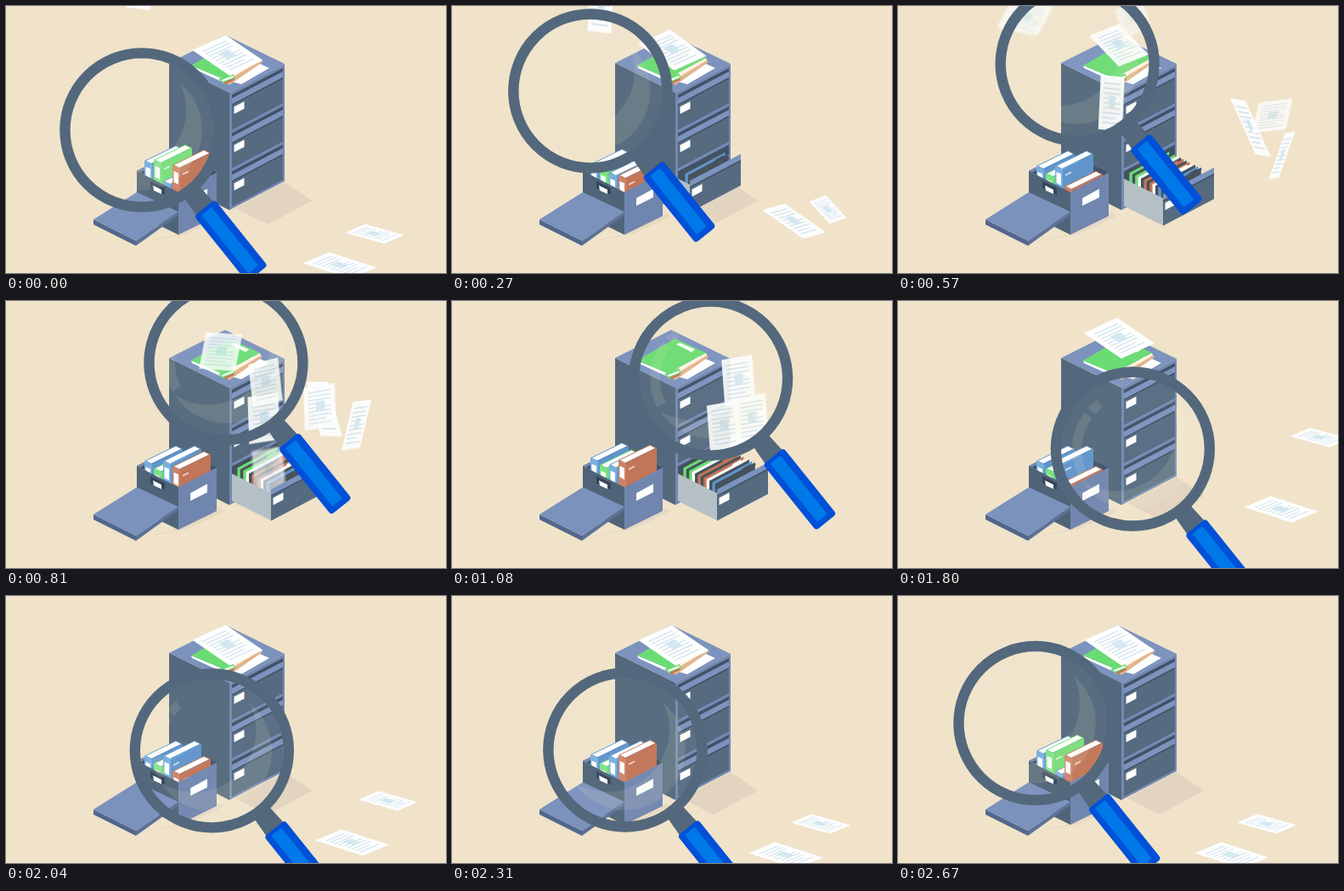
Recreate the animation shown at these times as an HTML page. Size 518 by 314 pixels, loop 2700 ms.

```html
<!DOCTYPE html>
<html lang="en">
<head>
<meta charset="utf-8">
<title>Searching the archive</title>
<style>
html, body { margin: 0; width: 100%; height: 100%; overflow: hidden; background: #f0e3ca; }
svg { display: block; width: 518px; height: 314px; }
</style>
</head>
<body>
<svg id="stage" viewBox="0 0 518 314" xmlns="http://www.w3.org/2000/svg"></svg>
<script>
const LOOP = 2700;
const C = {
  steel: '#53687c', dark: '#405267', light: '#7c93be', frame: '#7489b2', panel: '#566b80', ink: '#46525c',
  green: '#6bdc74', orange: '#c27558', blue: '#5f95cb', white: '#fdfefe', tan: '#e3b48c'
};

// ---- motion helpers ----
const clamp = v => Math.max(0, Math.min(1, v));
const mix = (a, b, u) => a.map((v, i) => v + (b[i] - v) * u);
const smooth = (t, from, to) => {
  const u = clamp((t - from) / (to - from));
  return u * u * (3 - 2 * u);
};
// 1 between the two ramps, 0 outside.
const hold = (t, rise, fall) => smooth(t, ...rise) - smooth(t, ...fall);

// Smooth curve through keys [time, ...values]; closed curves wrap around the loop.
function curve(keys, closed) {
  const n = keys.length;
  const key = i => {
    if (!closed) return keys[Math.max(0, Math.min(n - 1, i))];
    const [t, ...v] = keys[(i + n) % n];
    return [t + LOOP * Math.floor(i / n), ...v];
  };
  const slope = (i, j) => (key(i + 1)[j] - key(i - 1)[j]) / (key(i + 1)[0] - key(i - 1)[0]);
  return t => {
    let i = 0;
    while (i < n - (closed ? 1 : 2) && key(i + 1)[0] <= t) i++;
    const a = key(i), b = key(i + 1), d = b[0] - a[0], u = clamp((t - a[0]) / d), w = 1 - u;
    return a.map((v, j) => v * (1 + 2 * u) * w * w + b[j] * u * u * (3 - 2 * u) +
      d * u * w * (slope(i, j) * w - slope(i + 1, j) * u)).slice(1);
  };
}

// ---- drawing helpers ----
const poly = (pts, fill) => `<polygon points="${pts}" fill="${fill}"/>`;
const rect = (x, y, w, h, fill, more = '') =>
  `<rect x="${x}" y="${y}" width="${w}" height="${h}" fill="${fill}" ${more}/>`;
// Sheared plane of the cabinet front: u runs along the face, v down.
const face = s => `<g transform="matrix(1 -.523 0 1 263 0)">${s}</g>`;
const slot = v => rect(3, v, 60, 41, C.dark);
const drawer = v => rect(3, v + 10, 60, 31, C.panel) + rect(3, v + 4, 60, 7, C.light) +
  rect(3, v + 11, 60, 1.6, C.dark) + rect(5.5, v + 15.5, 12, 8.5, C.white);

const cabinet = poly('270,238 328,207 360,229 308,257', '#e2d4c0') +
  poly('192,67 263,102 263,240 192,204', C.steel) +
  poly('192,67 258,34 328,68 263,102', C.light) +
  face(rect(0, 102, 65, 138, C.frame) +
    [106, 151, 196].map(slot).join('') + [106, 151].map(drawer).join(''));

const pile = poly('262,88 290,64 310,73 277,92', C.white) +
  poly('254,86 299,62 302,66 263,93', C.tan) +
  poly('254,85 299,61 300,64 258,89', '#fff3e2') +
  poly('218,70 254,85 254,89 219,73', C.white) +
  poly('218,70 263,44 299,61 254,85', C.green) +
  poly('264,51 268,49 286,57 282,60', C.white) +
  poly('250,86 267,79 270,85 257,92', C.green) +
  poly('254,87 267,82 268,84 255,89', C.white) +
  poly('256,90 268,85 269,87 258,92', C.orange);

const boxBack = poly('160,278 204,268 252,244 258,247 214,268', '#e7d9c2') +
  poly('154,194 198,172 248,196 203,219', '#42546a') +
  poly('154,194 198,172 198,175 157,196', C.frame);

const boxFront = poly('154,194 203,219 203,269 154,245', '#4f6478') +
  poly('203,219 248,196 248,247 203,269', '#7186ae') +
  poly('217,226 237,215 237,225 217,235', C.white) +
  poly('170,206 187,214 187,222 170,214', '#34465a') +
  poly('173,211 183,216 183,221 174,217', C.white) +
  poly('103,251 153,276 153,282 103,257', '#52678a') +
  poly('153,276 203,242 203,246 153,282', '#5d7297') +
  poly('103,251 154,219 203,242 153,276', '#7b92bd');

const bookArt = (color, edge) =>
  poly('9,4 45,-14 45,22 9,40', color) + poly('0,0 37,-18 45,-14 9,4', color) +
  poly('2,0 37,-17 43,-14 8,3', C.white) + poly('0,0 9,4 9,36 0,32', edge) +
  poly('1.5,7 7,9.5 7,23 1.5,20', C.white) + poly('12,10 19,6.5 19,8.5 12,12', '#ffffffaa');

const fileArt = (color, tab) => poly('2,-9 49,-34 49,-4 2,24', color) +
  poly(`${tab},-23 ${tab + 2},-27 ${tab + 11},-32 ${tab + 13},-30`, color);

const sheetArt = rect(0, 0, 100, 100, C.white) +
  Array.from({ length: 9 }, (_, i) =>
    rect(14, 13 + i * 9, i % 4 == 3 ? 56 : 72, 2.6, '#cfe0e9')).join('') +
  rect(38, 36, 27, 24, '#d3e8f1');

const lensArt = `
  <circle r="85" fill="#fff" opacity=".03"/>
  <g fill="#f6f2c6" opacity=".11">
    <path d="M45 -55A71 71 0 1 1 -60 38A73 73 0 0 0 45 -55Z"/>
    <path d="M-63 34A72 72 0 0 1 -57 -43L-48 -36A60 60 0 0 0 -53 28Z"/>
    <path d="M-53 -48A72 72 0 0 1 -42 -58L-36 -49A60 60 0 0 0 -44 -41Z"/>
  </g>
  <circle r="90.5" fill="none" stroke="${C.steel}" stroke-width="12.4"/>
  <g transform="rotate(51.2)">
    ${poly('90,-11 120,-13 120,13 90,11', C.steel)}
    ${rect(117.5, -15.5, 99.5, 31, '#0050d8', 'rx="4"')}
    ${rect(122, -7, 88, 15, '#0079e8', 'rx="1"')}
  </g>`;

// ---- moving parts ----
const lensPath = curve([[0, 160, 146], [285, 164, 98], [570, 211, 68], [1080, 304.5, 91],
  [1470, 313, 146], [1800, 276.5, 174], [2310, 204, 181]], true);

// Binders bob twice per loop; "away" is the shift while out of the home position.
const books = [
  { color: C.blue, edge: '#79aede', top: 182, away: 6, rise: [0, 450], fall: [800, 1300] },
  { color: C.green, edge: '#7be383', top: 181, away: 16, rise: [40, 420], fall: [960, 1320] },
  { color: C.blue, edge: '#79aede', top: 206, away: -18, rise: [60, 450], fall: [960, 1330] },
  { color: C.orange, edge: '#cf8264', top: 187, away: 25, rise: [100, 450], fall: [570, 950] }
];

// Hanging files: three colour bands, each with dark and white neighbours.
const files = Array.from({ length: 13 }, (_, i) => {
  const band = [C.green, C.orange, C.blue][Math.floor(i / 5)];
  return { color: [C.ink, band, C.ink, band, C.white][i % 5], depth: 1 + i * 3.4, tab: 28 + i * 5 % 14 };
});

// Pose: centre, short edge, long edge. Each sheet passes "mid", hovers, then drops into the drawer;
// sheets with a "rest" pose later glide back to it from an offset.
const MID = 570, MOUTH = [318, 216], UPRIGHT = [36, -6, 4, 54];
const sheets = [
  { rest: [261, 58, 39, -18, 44, 30], mid: [260, 46, 35, -14, 35, 36], hover: [296, 110], at: 760,
    back: { from: [-4, -110], start: 1600, power: 5 } },
  { rest: [393, 305, 31, -13, 56, 18], mid: [415, 143, 18, 3, 30, 66], hover: [320, 147], at: 1080,
    back: { from: [165, -170], start: 1400, power: 1.5 } },
  { rest: [434, 268, 24, -10, 46, 13], mid: [452, 176, 12, -2, -19, 54], hover: [353, 138], at: 1080,
    back: { from: [178, -305], start: 1400, power: 1.5 } },
  { mid: [441, 129, 40, -5, -8, 36], hover: [352, 130], at: 880, soft: .78 },
  { mid: [149, 13, 48, 10, -18, 34], hover: [337, 93], at: 1080, soft: .75 },
  { mid: [251, 114, 28, 3, -3, 64], hover: [280, 150], at: 680 },
  { mid: [276, 13, 30, -18, 12, 34], hover: [312, 120], at: 880, soft: .6 }
];

for (const s of sheets) {
  const { rest, mid, hover, at, soft = .95 } = s;
  const far = [0, 1].map(i => mid[i] + 1.4 * (mid[i] - MOUTH[i]));
  s.end = at + 170;
  s.flight = curve([
    rest ? [150, ...rest, 1] : [MID - 370, ...far, ...mid.slice(2), soft],
    [MID, ...mid, soft], [at, ...hover, ...UPRIGHT, .9], [s.end, ...MOUTH, ...UPRIGHT, .9]
  ]);
}

function pose(s, t) {
  if (t < s.end) {
    const p = s.flight(t);
    p[6] = clamp(p[6]) * (1 - smooth(t, s.end - 60, s.end));
    return p;
  }
  if (!s.rest || t < s.back.start) return [0, 0, 1, 0, 0, 1, 0];
  const left = (1 - clamp((t - s.back.start) / (2200 - s.back.start))) ** s.back.power;
  const [x, y, ...edges] = s.rest;
  return [x + s.back.from[0] * left, y + s.back.from[1] * left, ...edges, 1];
}

// ---- scene ----
const stage = document.getElementById('stage');
const group = (name, art) => `<g class="${name}">${art}</g>`;
stage.innerHTML = cabinet + pile +
  files.map(f => group('file', fileArt(f.color, f.tab))).join('') +
  sheets.map(() => group('sheet', sheetArt)).join('') +
  poly('', '#b4c0c5') + group('front', face(drawer(196))) + boxBack +
  books.map(b => group('book', bookArt(b.color, b.edge))).join('') + boxFront +
  group('lens', lensArt);

const all = name => [...stage.querySelectorAll('.' + name)];
const fileEls = all('file'), sheetEls = all('sheet'), bookEls = all('book');
const [front] = all('front'), [lens] = all('lens');
const side = stage.querySelector('polygon[points=""]');
const move = (node, x, y) => node.setAttribute('transform', `translate(${x} ${y})`);

function draw(t) {
  const out = 46 * hold(t, [150, 480], [1420, 1750]), drop = out / 2;
  move(front, out, drop);
  side.setAttribute('points', `266,203 ${266 + out},${203 + drop} ${266 + out},${235 + drop} 266,235`);
  files.forEach((f, i) => {
    const d = f.depth - 46 + out;
    fileEls[i].setAttribute('visibility', d > 0 ? 'visible' : 'hidden');
    move(fileEls[i], 266 + d, 203 + d / 2);
  });

  sheets.forEach((s, i) => {
    const [x, y, ax, ay, bx, by, alpha] = pose(s, t);
    const m = [ax / 100, ay / 100, bx / 100, by / 100, x - (ax + bx) / 2, y - (ay + by) / 2];
    sheetEls[i].setAttribute('transform', `matrix(${m})`);
    sheetEls[i].setAttribute('opacity', alpha);
    sheetEls[i].style.filter = alpha > 0 && alpha < .99 ? `blur(${(1 - alpha) * 9}px)` : 'none';
  });

  books.forEach((b, i) =>
    move(bookEls[i], 163 + 11 * i, b.top + b.away * hold(t % (LOOP / 2), b.rise, b.fall)));
  move(lens, ...lensPath(t));
}

const start = performance.now();
function tick() {
  draw((performance.now() - start) % LOOP);
  requestAnimationFrame(tick);
}
draw(0);
requestAnimationFrame(tick);
</script>
</body>
</html>
```
